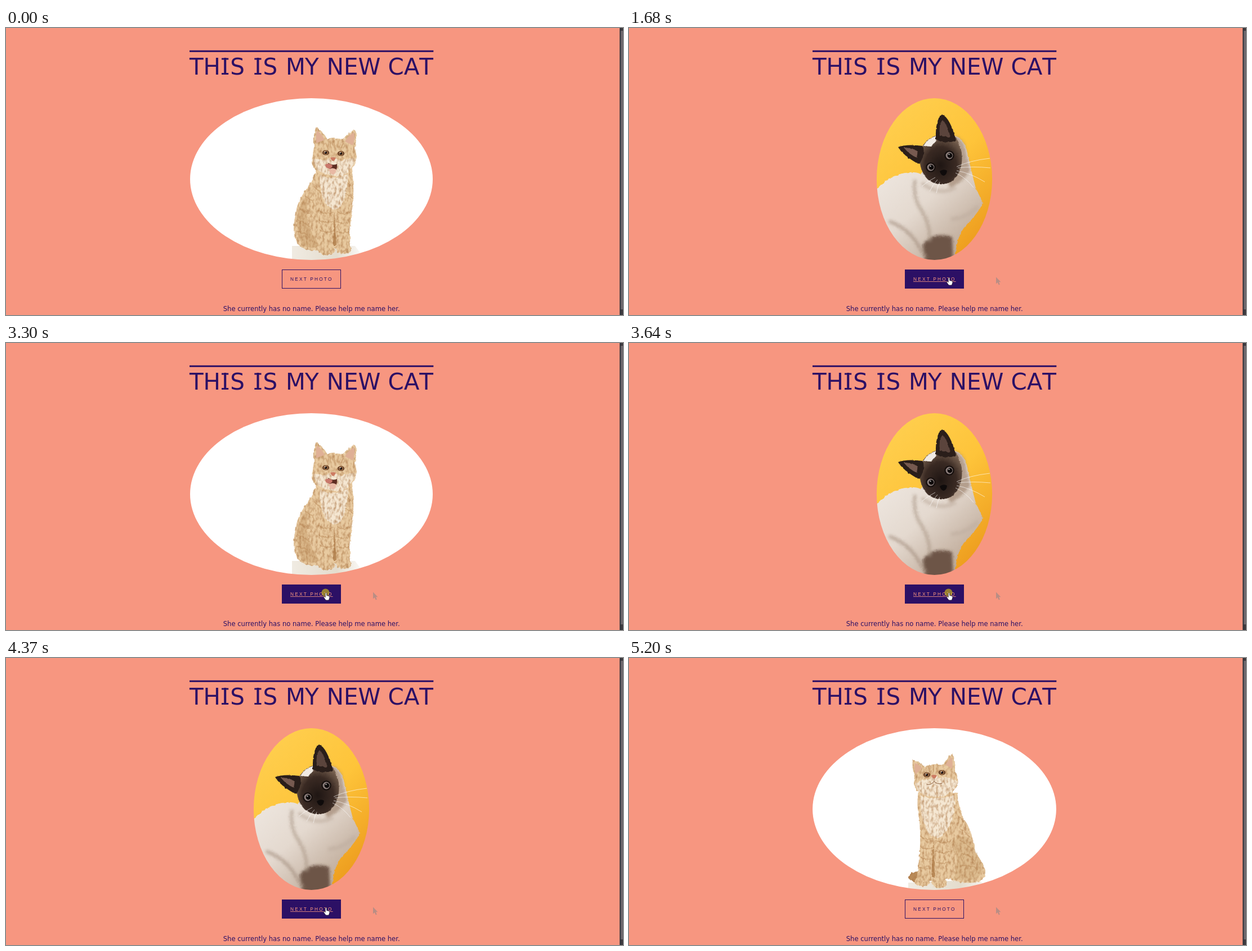
Recreate the animation shown at these times as an HTML page without scripts. Size 1096x511 px, loop 5.74 s.

```html
<!DOCTYPE html>
<html lang="en">
<head>
<meta charset="utf-8">
<title>My new cat</title>
<style>
html, body { margin: 0; width: 100%; height: 100%; overflow: hidden; background: #f79680; }
svg { display: block; width: 100vw; height: 100vh; }
text { font-family: "DejaVu Sans", Verdana, sans-serif; fill: #2c1065; }
.title { font-size: 40.4px; font-kerning: none; }
.note { font-size: 11.58px; text-anchor: middle; }
.label { font: 8.3px "Liberation Sans", Arial, sans-serif; letter-spacing: 2.2px; }
.on .label { fill: #f79680; text-decoration: underline; }

.coat { fill: #e8caa0; }
.pale { fill: #f5e7d2; }
.shade { fill: #b98a58; }
.inner { fill: #dfb096; }
.line { fill: none; stroke: #b98a58; stroke-width: 1.8; stroke-linecap: round; opacity: .5; }
.thin { fill: none; stroke: #8a5c3c; stroke-width: 1; stroke-linecap: round; }
.whisker { fill: none; stroke: #fff; stroke-width: .8; opacity: .75; }

.photo, .tap, .arrow, .hand, .ghost, .on { opacity: 0; animation: 5.74s step-end infinite; }
.lick { animation-name: lick; }
.siam { animation-name: siam; }
.reach { animation-name: reach; }
.gaze { animation-name: gaze; }
.tap { animation-name: tap; }
.ghost { animation-name: ghost; }
.arrow { animation-name: arrow; }
.hand { animation-name: hand; }
.on { animation-name: on; animation-timing-function: linear; }

@keyframes lick {
  0%, 52.6%, 72.64% { opacity: 1; }
  29.26%, 58.7%, 76.12% { opacity: 0; }
}
@keyframes siam {
  29.26%, 58.7%, 76.12% { opacity: 1; }
  0%, 39.71%, 64.62%, 78.56% { opacity: 0; }
}
@keyframes reach {
  39.71%, 64.62%, 78.56% { opacity: 1; }
  0%, 46.68%, 69.33%, 81% { opacity: 0; }
}
@keyframes gaze {
  46.68%, 69.33%, 81%, 100% { opacity: 1; }
  0%, 52.6%, 72.64% { opacity: 0; }
}
@keyframes tap {
  28.04%, 38.49%, 45.46%, 51.38%, 57.48%, 63.4%, 68.11%, 71.42%, 74.9%, 77.34%, 79.78% { opacity: 1; }
  52.6%, 58.7%, 69.33% { opacity: .4; }
  0%, 29.26%, 39.71%, 46.68%, 54%, 59.92%, 64.62%, 70.37%, 72.64%, 76.12%, 78.56%, 81% { opacity: 0; }
}
@keyframes ghost {
  0% { opacity: 0; }
  15.32%, 100% { opacity: 1; }
}
@keyframes arrow {
  0% { opacity: 0; }
  5.56% { opacity: 1; transform: translate(994px, 504px); }
  6.78% { opacity: 1; transform: translate(932px, 501px); }
  8% { opacity: 1; transform: translate(868px, 494px); }
  9.22% { opacity: 1; transform: translate(806px, 485px); }
  10.44% { opacity: 1; transform: translate(755px, 473px); }
  11.66% { opacity: 1; transform: translate(716px, 464px); }
  12.88% { opacity: 1; transform: translate(686px, 456px); }
  14.1% { opacity: 1; transform: translate(652px, 443px); }
  15.32% { opacity: 1; transform: translate(598px, 442px); }
  16.37% { opacity: 0; }
  85.7% { opacity: 1; transform: translate(640px, 465px); }
  86.92% { opacity: 1; transform: translate(748px, 480px); }
  88.14% { opacity: 1; transform: translate(880px, 492px); }
  89.36% { opacity: 1; transform: translate(1038px, 502px); }
  90.58% { opacity: 0; }
}
@keyframes hand {
  0% { opacity: 0; }
  16.37% { opacity: 1; transform: translate(14px, -3px); }
  17.59% { opacity: 1; transform: translate(5px, -1px); }
  18.81% { opacity: 1; transform: translate(1px, 0); }
  20.02% { opacity: 1; transform: none; }
  84.48% { opacity: 1; transform: translate(13px, 4px); }
  85.7% { opacity: 0; }
}
@keyframes on {
  0%, 16.37% { opacity: 0; }
  20.02%, 85.7% { opacity: 1; }
  90.58%, 100% { opacity: 0; }
}
</style>
</head>
<body>
<svg viewBox="0 0 1096 511" preserveAspectRatio="none">
  <defs>
    <clipPath id="c1"><ellipse cx="542.5" cy="269" rx="215.5" ry="144"/></clipPath>
    <clipPath id="c2"><ellipse cx="542.5" cy="269" rx="238.3" ry="144"/></clipPath>
    <clipPath id="c3"><ellipse cx="542.5" cy="269" rx="216.4" ry="144"/></clipPath>
    <clipPath id="c4"><ellipse cx="542.5" cy="269" rx="102.6" ry="144"/></clipPath>
    <linearGradient id="sun" x1="0" y1="0" x2=".7" y2="1">
      <stop offset="0" stop-color="#ffd255"/><stop offset=".55" stop-color="#fec43a"/><stop offset="1" stop-color="#ec9a1c"/>
    </linearGradient>
    <linearGradient id="cream" x1="0" y1="0" x2=".8" y2="1">
      <stop offset="0" stop-color="#f4efea"/><stop offset=".55" stop-color="#e4d9cf"/><stop offset="1" stop-color="#b7a18e"/>
    </linearGradient>
    <radialGradient id="mask" cx=".5" cy=".62" r=".62">
      <stop offset="0" stop-color="#1f1613"/><stop offset=".6" stop-color="#3a2a23"/><stop offset="1" stop-color="#7b6452"/>
    </radialGradient>
    <linearGradient id="floor" x1="0" y1="0" x2="1" y2="0">
      <stop offset="0" stop-color="#f0ebe2"/><stop offset=".6" stop-color="#e4dccd"/><stop offset="1" stop-color="#fff"/>
    </linearGradient>
    <!-- ruffled outline with a fine streaky coat -->
    <filter id="fur" x="-10%" y="-10%" width="120%" height="120%" color-interpolation-filters="sRGB">
      <feTurbulence type="fractalNoise" baseFrequency=".24 .13" numOctaves="2" seed="4" result="n"/>
      <feDisplacementMap in="SourceGraphic" in2="n" scale="5" xChannelSelector="R" yChannelSelector="G" result="s"/>
      <feColorMatrix in="n" values="0 0 0 0 .66  0 0 0 0 .45  0 0 0 0 .26  1.5 0 0 0 -.62"/>
      <feComposite in2="s" operator="in" result="t"/>
      <feMerge result="m"><feMergeNode in="s"/><feMergeNode in="t"/></feMerge>
      <feGaussianBlur stdDeviation=".4"/>
    </filter>
    <filter id="soft" x="-10%" y="-10%" width="120%" height="120%" color-interpolation-filters="sRGB">
      <feTurbulence type="fractalNoise" baseFrequency=".2" numOctaves="2" seed="9"/>
      <feDisplacementMap in="SourceGraphic" scale="3" xChannelSelector="R" yChannelSelector="G"/>
      <feGaussianBlur stdDeviation=".6"/>
    </filter>
    <filter id="blur" x="-20%" y="-20%" width="140%" height="140%"><feGaussianBlur stdDeviation="2.5"/></filter>
    <g id="eye">
      <ellipse rx="6.2" ry="4.6" fill="#6b452c"/>
      <circle r="3.7" fill="#a1734a"/><circle r="2.3" fill="#1c1210"/>
      <circle cx="-1.3" cy="-1.4" r=".9" fill="#fff"/>
    </g>
    <g id="paw">
      <ellipse rx="14" ry="8.5" class="coat"/>
      <path d="M-5 1v6M1 2v6M7 1v6" class="line"/>
    </g>
    <path id="nose" d="M-5 -3Q0 -5 5 -3Q3 2 0 3Q-3 2 -5 -3Z" fill="#cd7b62"/>
    <path id="pointer" d="M0 0V12L2.8 9.6L4.8 14L6.8 13L4.9 8.8H8.4Z"/>
  </defs>

  <rect width="1096" height="511" fill="#f79680"/>
  <rect x="1090" width="6" height="511" fill="#3c393e"/>
  <rect x="1092" y="5" width="4" height="496" fill="#6b666b"/>

  <rect x="326" y="39.8" width="433.3" height="3" fill="#2c1065"/>
  <text class="title" y="83"><tspan x="326 350.6 383.2 398.2">THIS</tspan> <tspan x="441.5 456.5">IS</tspan> <tspan x="497 530.9">MY</tspan> <tspan x="569.7">NEW</tspan> <tspan x="678.5">CAT</tspan></text>
  <path d="M383 55h12.2M383 81.5h12.2M441.3 55h12.2M441.3 81.5h12.2" stroke="#2c1065" stroke-width="3"/>

  <g class="photo lick" clip-path="url(#c1)">
    <rect x="300" y="120" width="490" height="300" fill="#fff"/>
    <path d="M508 388H620L640 415H508Z" fill="url(#floor)"/>
    <g filter="url(#fur)">
      <path class="coat" d="M552 250Q545 272 530 291Q517 310 514 334Q507 365 517 383Q530 398 556 396L612 390Q609 360 615 325Q620 285 614 252Z"/>
      <path class="shade" d="M541 290Q526 330 543 365L557 388Q540 394 525 387Q508 350 524 312Z" opacity=".35"/>
      <path class="pale" d="M558 262Q580 272 608 260Q606 300 594 318Q580 330 567 312Q556 290 558 262Z"/>
      <path class="line" d="M532 300q12 5 16 16M522 322q14 4 22 14M517 342q16 4 24 14M517 362q14 2 22 11M556 325q12 8 24 3M556 342q12 7 24 2M557 360q12 6 23 2M588 328q12 6 24 0M588 345q12 6 22 0M588 362q12 5 21 0M606 275q8 4 10 12M603 295q8 3 13 9M548 282q6 10 14 12"/>
      <path class="shade" d="M583 325L587 387H581Z"/>
      <use href="#paw" x="570" y="396"/><use href="#paw" x="600" y="393.5"/>
      <path class="coat" d="M547 212Q546 180 552 177Q562 183 571 198Q584 194 598 199Q609 184 620 181Q624 190 620 214L623 230Q619 246 612 254Q602 266 582 266Q560 264 550 253Q541 242 544 232Z"/>
      <path class="pale" d="M546 234Q558 232 567 236L581 229L594 237Q610 230 621 233Q614 256 597 263Q570 266 553 252Z"/>
    </g>
    <path class="inner" d="M551 205Q550 186 553 183Q561 189 566 199ZM602 202Q610 189 618 186Q621 195 616 209Z"/>
    <path class="line" d="M576 201v11M583 200v12M590 201l-1 11M568 205l3 8M599 206l-4 8"/>
    <path d="M572 240Q580 246 588 242Q589 254 581 258Q574 255 572 240Z" fill="#5e2d22"/>
    <path d="M573 252Q580 247 587 252Q585 261 580 261Q575 259 573 252Z" fill="#e8b9a4"/>
    <path d="M567 243Q574 239 580 245Q579 251 572 250Q567 248 567 243Z" fill="#c9786b"/>
    <use href="#eye" x="568" y="222"/><use href="#eye" x="595" y="223.5"/>
    <use href="#nose" x="581" y="234"/>
  </g>

  <g class="photo reach" clip-path="url(#c2)">
    <rect x="300" y="120" width="490" height="300" fill="#fff"/>
    <path d="M545 396L645 388L680 415H545Z" fill="url(#floor)"/>
    <g filter="url(#fur)">
      <path class="coat" d="M539 215Q537 250 541 286Q541 320 535 352Q534 375 547 386L552 400H582L590 396L640 390Q656 378 655 350Q650 315 634 292Q622 270 613 225Z"/>
      <path class="shade" d="M585 330Q584 370 590 394H615Q648 388 648 350Q630 360 610 342Z" opacity=".35"/>
      <path class="pale" d="M546 226Q575 236 606 226Q604 262 595 288Q580 322 566 316Q548 290 546 226Z"/>
      <path class="line" d="M541 330q14 8 32 3M537 347q15 8 32 2M537 364q17 7 35 2M545 379q14 6 30 0M610 262q10 8 13 20M615 285q11 7 16 18M630 308q8 8 11 18M640 330q8 7 9 16M596 262q8 9 10 19M543 262q7 7 13 7M544 282q7 7 13 7"/>
      <path class="shade" d="M580 320Q586 355 585 388L577 360Z"/>
      <path class="coat" d="M598 272Q618 285 624 308L622 328Q610 342 594 326Q606 314 600 300Z"/>
      <use href="#paw" x="609" y="326"/>
      <use href="#paw" x="567" y="399"/><use href="#paw" x="629" y="390"/>
      <path class="coat" d="M528 186Q521 158 524 147Q537 150 548 161Q564 154 580 158Q590 145 602 139Q607 152 607 165Q617 180 617 196Q611 212 598 222Q578 232 550 226Q530 216 529 206Z"/>
      <path class="pale" d="M531 198Q552 184 570 192L581 182L594 188Q608 186 616 196Q610 218 592 224Q556 230 538 217Z"/>
    </g>
    <path class="inner" d="M531 180Q526 162 528 153Q536 156 543 164ZM587 157Q594 149 600 146Q604 156 602 165Z"/>
    <path class="line" d="M563 160l2 12M572 159l2 13M580 161v12M553 163l3 8"/>
    <path d="M570 199Q580 188 598 191Q601 207 588 219Q574 216 570 199Z" fill="#6b2f2a"/>
    <path d="M571 201Q577 210 588 203Q594 198 594 191Q602 199 597 207Q586 216 574 209Z" fill="#cf7b74"/>
    <path d="M574 212Q582 209 589 211Q585 220 579 219Z" fill="#f1d0bc"/>
    <use href="#eye" transform="translate(561 178) scale(1.12)"/><use href="#eye" transform="translate(591 175) scale(1.12)"/>
    <use href="#nose" x="580" y="183"/>
  </g>

  <g class="photo gaze" clip-path="url(#c3)">
    <rect x="300" y="120" width="490" height="300" fill="#fff"/>
    <path d="M496 400L620 395L650 415H496Z" fill="url(#floor)"/>
    <g filter="url(#fur)">
      <path class="shade" d="M515 380Q499 380 497 390Q498 399 515 399Z"/>
      <path class="coat" d="M514 236Q510 262 516 290Q519 330 515 360L511 395H535L545 402L570 392Q580 402 612 400Q634 398 633 378Q630 365 615 347Q612 318 601 296Q586 275 583 240Z"/>
      <path class="shade" d="M570 330Q590 310 606 322Q618 350 628 366Q630 390 605 397L575 394Q590 360 570 330Z" opacity=".25"/>
      <path class="pale" d="M518 245Q545 254 578 244Q582 285 560 312Q545 330 530 308Q515 280 518 245Z"/>
      <path class="line" d="M518 318q10 7 21 3M518 336q10 6 21 2M517 354q11 6 22 2M515 372q11 5 21 2M545 325q12 7 26 1M545 344q12 6 26 0M545 363q12 5 24 0M585 282q10 7 13 18M588 305q11 5 17 14M588 326q12 4 20 14M591 348q14 2 23 13M592 369q16-1 27 8"/>
      <path class="shade" d="M541 322L543 390H537Z"/>
      <use href="#paw" x="521" y="398"/><use href="#paw" x="551" y="401"/>
      <path class="coat" d="M507 212Q502 192 504 181Q515 184 525 193Q542 187 558 190Q566 176 575 170Q580 183 579 200Q586 212 584 226Q577 240 565 246Q545 253 524 246Q508 236 506 224Z"/>
      <path class="pale" d="M508 225Q520 214 533 217L541 208L553 214Q572 210 584 222Q576 240 560 246Q530 250 515 238Z"/>
    </g>
    <path class="inner" d="M509 207Q506 193 508 187Q514 189 520 196ZM562 190Q568 180 573 177Q576 187 574 197Z"/>
    <path class="line" d="M532 193l2 10M541 191v11M549 192l-1 10"/>
    <use href="#eye" x="529" y="208"/><use href="#eye" x="556" y="204"/>
    <use href="#nose" x="542" y="212"/>
    <path class="thin" d="M542 215v5Q536 227 529 225M542 220Q548 226 556 223"/>
  </g>

  <g class="photo siam" clip-path="url(#c4)">
    <rect x="430" y="120" width="230" height="300" fill="url(#sun)"/>
    <g filter="url(#soft)">
      <path fill="url(#cream)" d="M430 300Q452 267 485 259Q506 254 518 260L575 192Q592 192 600 218Q607 250 616 285L629 312Q618 332 600 350Q579 371 579 420H430Z"/>
      <g filter="url(#blur)">
        <path d="M577 192Q596 196 599 222L606 254Q592 276 570 284Q560 270 577 192Z" fill="#a58d78" opacity=".75"/>
        <path d="M522 385Q540 362 574 372L576 420H526Z" fill="#6d5546"/>
        <path d="M508 270Q504 302 518 322Q536 350 534 380" fill="none" stroke="#ab9887" stroke-width="6" opacity=".6"/>
        <path d="M462 344Q497 358 512 384L528 409" fill="none" stroke="#a08b7a" stroke-width="6" opacity=".6"/>
        <path d="M520 276Q550 300 580 284M572 340Q598 340 620 318" fill="none" stroke="#bfae9f" stroke-width="7" opacity=".6"/>
      </g>
      <path d="M516 226Q520 200 548 190L580 194Q594 214 591 240Q588 262 572 274Q550 284 531 270Q515 254 516 226Z" fill="url(#mask)"/>
      <path d="M523 210Q530 197 546 192Q547 204 536 211Z" fill="#f1ebe4"/>
      <path d="M512 241Q486 226 478 212Q493 206 522 210Q527 224 516 242Z" fill="#2a1e1a"/>
      <path d="M488 213Q505 213 513 220L511 231Q498 225 488 213Z" fill="#775a50"/>
      <path d="M545 198Q544 162 556 154Q570 159 581 200Q562 208 545 198Z" fill="#2a1e1a"/>
      <path d="M552 192Q550 172 557 164Q567 174 571 195Z" fill="#5b443c"/>
    </g>
    <g fill="#8a7c79" stroke="#17100e" stroke-width="2.4">
      <circle cx="536" cy="248" r="7.6"/><circle cx="569" cy="227" r="7.6"/>
    </g>
    <g fill="#0e0a0a"><circle cx="537" cy="248" r="4.4"/><circle cx="570" cy="227" r="4.4"/></g>
    <g fill="#ddd"><circle cx="535.5" cy="246" r="1"/><circle cx="568.5" cy="225" r="1"/></g>
    <path d="M552 255Q559 250 565 254Q564 262 559 263Q554 262 552 255Z" fill="#0f0b0b"/>
    <path class="whisker" d="M582 247Q605 236 641 232M584 249Q610 246 642 249M582 254Q606 258 632 274M580 258Q598 266 612 284M548 270Q540 278 534 291M544 266Q532 272 520 282M552 274Q548 282 546 294"/>
  </g>

  <rect x="490.5" y="430.5" width="104" height="33" fill="none" stroke="#2c1065"/>
  <text class="label" x="505" y="450">NEXT PHOTO</text>
  <g class="on">
    <rect x="490" y="430" width="105" height="34" fill="#2c1065"/>
    <text class="label" x="505" y="450">NEXT PHOTO</text>
  </g>
  <text class="note" x="542.7" y="504">She currently has no name. Please help me name her.</text>

  <g class="ghost"><use href="#pointer" x="652" y="443.5" fill="#b98d84"/></g>
  <circle class="tap" cx="567.5" cy="444.5" r="7" fill="#e4d312" fill-opacity=".58"/>
  <g class="hand">
    <path d="M567.2 445.2q1.5-1.2 2.5 .3v4l4 .9q1.5 .4 1.3 2l-.8 3.2-1 2.4h-5l-3.8-5q-.6-1.6 1-1.6l1.8 1.3Z" fill="#fff" stroke="#1a1020" stroke-width=".7"/>
  </g>
  <g class="arrow"><use href="#pointer" fill="#fff" stroke="#222" stroke-width=".8"/></g>
</svg>
</body>
</html>
```
